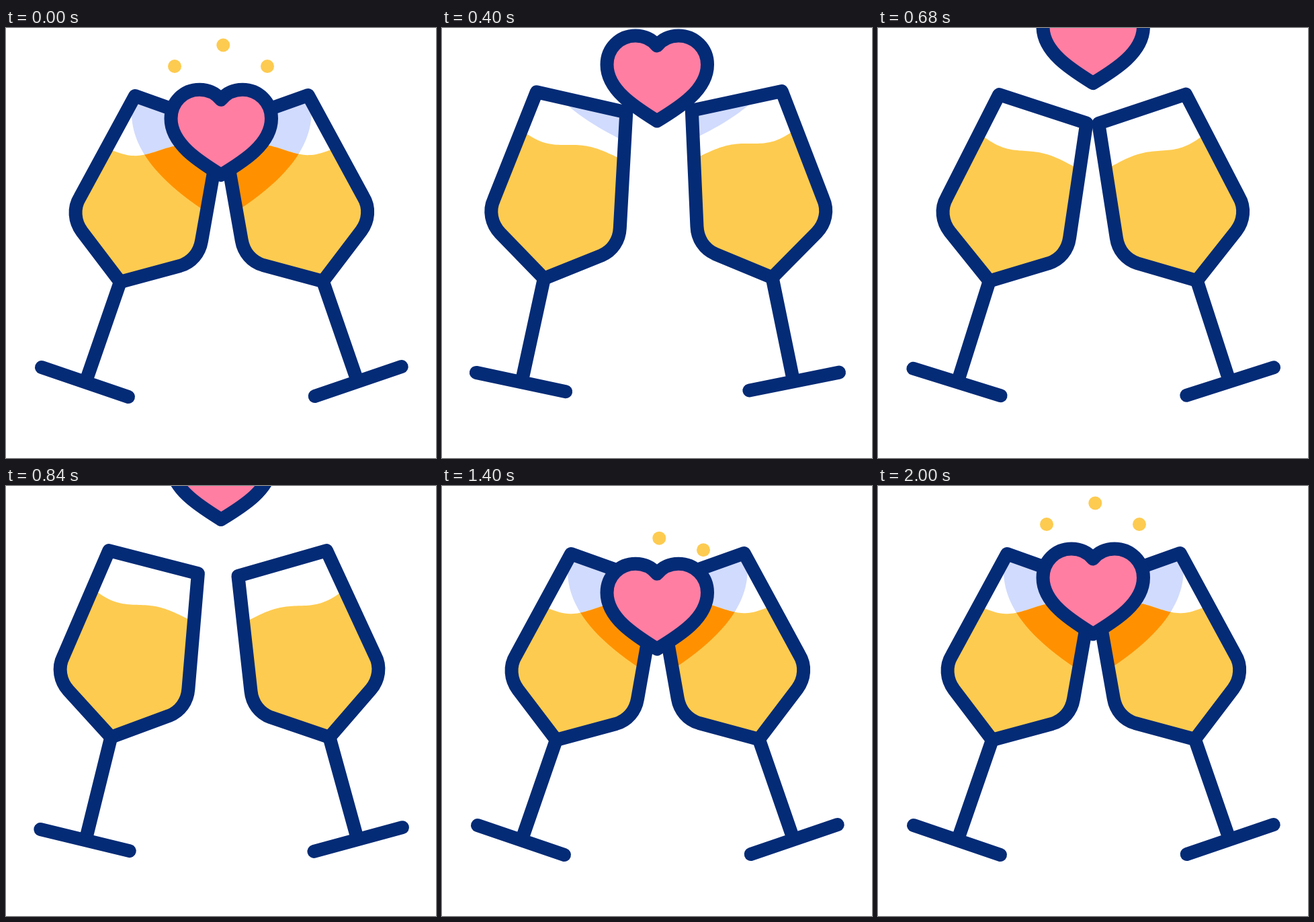
Write an HTML page with a canvas that moves like this. It is 640 px wide and 640 px high and loops after 2.04 s.

```html
<!DOCTYPE html>
<html lang="en">
<head>
<meta charset="utf-8">
<title>Toast</title>
<style>
  html, body { margin: 0; width: 100%; height: 100%; overflow: hidden; background: #fff; }
  canvas { display: block; }
</style>
</head>
<body>
<canvas id="stage" width="640" height="640"></canvas>
<script>
const ctx = document.getElementById('stage').getContext('2d');
const LOOP = 2040, REBIRTH = 1000;
const NAVY = '#042b76', PINK = '#ff7ea2', YELLOW = '#fdcb50', ORANGE = '#ff9100', LILAC = '#d1dbfd';
const FOOT = { x: 118, y: 527 };

const bowl = new Path2D('M192 101L321 147L291 317C288 335 276 349 259 354L170 378L113 303C102 288 100 268 110 252Z');
const stand = new Path2D('M170 378L118.5 527M53 505L182 549');
const heart = new Path2D('M320 107C312 97 301 92 288 92C264 92 245.5 111 245.5 135C245.5 173 288 199 320 219C353 199 395 173 395 135C395 111 376 92 352 92C339 92 328 97 320 107Z');
const halo = new Path2D('M190 100C175 165 215 225 321 288C427 225 467 165 452 100C440 20 340 20 321 75C302 20 200 20 190 100Z');

const ramp = (t, a, b) => Math.min(1, Math.max(0, (t - a) / (b - a)));
const smooth = (t, a, b) => { const p = ramp(t, a, b); return p * p * (3 - 2 * p); };
const swing = (t, a, b, c) => smooth(t, a, b) - smooth(t, b, c);

// A fading ripple on a surface that slopes while the liquid sloshes
function liquidPath(tilt, t) {
  const slosh = Math.sin(Math.PI * ramp(t, 0, 1320));
  const level = 180.5 + 4 * slosh - 1.6 * tilt;
  const slope = 16 * slosh - 1.8;
  const path = new Path2D('M400 450H0');
  for (let x = 130; x <= 340; x += 3) {
    const u = (x - 230) / 40;
    const ripple = -6.5 * Math.exp(-u / 4) * Math.sin(1.745 * (u - 0.1));
    path.lineTo(x, level + slope * u + ripple);
  }
  return path;
}

function scaleAbout(x, y, s) {
  ctx.translate(x, y);
  ctx.scale(s, s);
  ctx.translate(-x, -y);
}

function drawGlass(firstTilt, secondTilt, mirrored, t) {
  const tilt = firstTilt * swing(t, 0, 350, 610) + secondTilt * swing(t, 610, 810, 1020);
  const angle = tilt * Math.PI / 180;
  const liquid = liquidPath(tilt, t);
  const place = (dx, dy, turn) => {
    mirrored ? ctx.setTransform(-1, 0, 0, 1, 641.7, -1) : ctx.resetTransform();
    ctx.translate(FOOT.x + dx, FOOT.y + dy);
    ctx.rotate(-turn);
    ctx.translate(-FOOT.x, -FOOT.y);
  };
  const fillHalo = color => {
    const fresh = t > REBIRTH;
    place(0, fresh ? 0 : -0.22 * t, angle);
    scaleAbout(320.5, 180, fresh ? smooth(t, REBIRTH, 1300) : 1);
    ctx.fillStyle = color;
    ctx.fill(halo);
  };

  ctx.save();
  place(0, 0, angle);
  ctx.clip(bowl);
  fillHalo(LILAC);
  // The liquid follows the glass sideways without turning
  place(-347 * Math.sin(angle), 0, 0);
  ctx.fillStyle = YELLOW;
  ctx.fill(liquid);
  ctx.clip(liquid);
  fillHalo(ORANGE);
  ctx.restore();

  ctx.save();
  place(0, 0, angle);
  ctx.stroke(bowl);
  ctx.stroke(stand);
  ctx.restore();
}

function drawDot(x, y, fade, birth, t) {
  const fresh = t > REBIRTH;
  const r = 10 * (fresh ? smooth(t, birth, birth + 120) : 1 - smooth(t, fade, fade + 480));
  const drop = fresh ? (1 - ramp(t, birth, LOOP)) ** 3 : 0;
  ctx.fillStyle = YELLOW;
  ctx.beginPath();
  ctx.arc(x, y + (144 - y) * drop, r, 0, 7);
  ctx.fill();
}

function drawHeart(dy, s) {
  if (s <= 0) return;
  ctx.save();
  ctx.translate(0, dy);
  scaleAbout(320.3, 156, s);
  ctx.fillStyle = PINK;
  ctx.fill(heart);
  ctx.stroke(heart);
  ctx.restore();
}

function draw(t) {
  ctx.clearRect(0, 0, 640, 640);
  ctx.strokeStyle = NAVY;
  ctx.lineWidth = 20;
  ctx.lineCap = ctx.lineJoin = 'round';

  drawGlass(7.6, 5.5, false, t);
  drawGlass(8.3, 3.9, true, t);
  drawDot(251, 57, 140, 1370, t);
  drawDot(323.3, 25.5, 0, 1200, t);
  drawDot(389, 57, 0, 1200, t);
  drawHeart(-0.201 * t, 1);
  drawHeart(0.037 * (LOOP - t), smooth(t, 980, 1260));
}

const start = performance.now();
function frame() {
  draw((performance.now() - start) % LOOP);
  requestAnimationFrame(frame);
}
frame();
</script>
</body>
</html>
```
